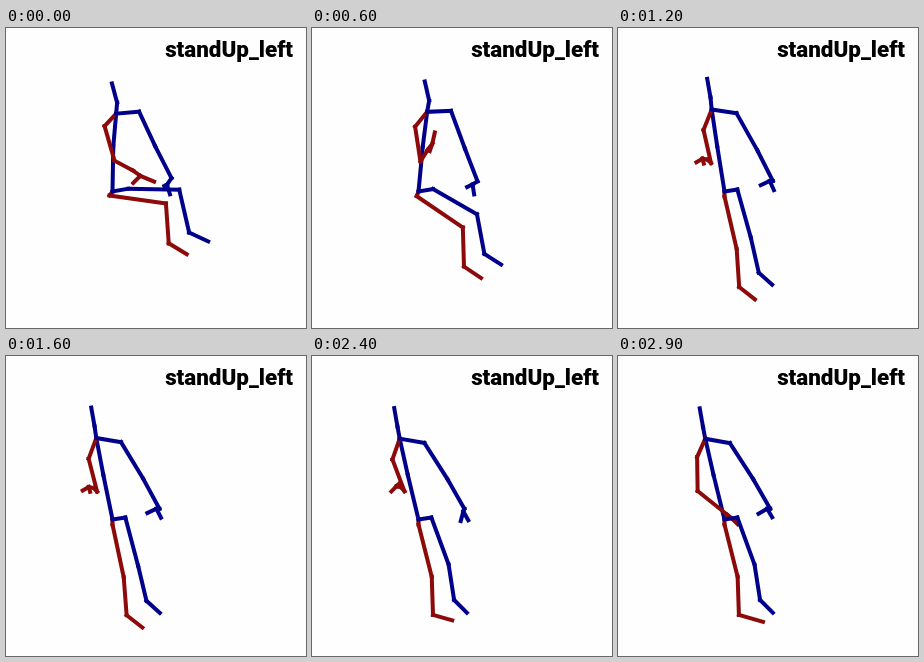
These frames come from a looping animation (300x300 px, 3000 ms). An HTML page with a canvas:

```html
<!DOCTYPE html>
<html>
<head>
<meta charset="utf-8">
<style>
  html, body { margin: 0; height: 100%; overflow: hidden; background: #fefefe; }
  canvas { display: block; }
</style>
</head>
<body>
<canvas id="stage" width="300" height="300"></canvas>
<script>
const ctx = document.getElementById('stage').getContext('2d');
const LOOP = 3000, STEP = 100;
const BLUE = '#00008b', RED = '#8c0a0a';
const PELVIS = [106, 163];

// A bone turns from its sitting to its standing angle (degrees, clockwise).
// len: sitting, standing and optional final length.
// lean, drift and reach: extra turn while leaning forward, settling and reaching.
const bone = (len, sit, stand, extra) =>
  ({ len, sit, stand, lean: 0, drift: 0, reach: 0, ...extra });

const trunk = [
  bone([45, 46], -89, -104, { lean: 12 }),
  bone([33, 37], -85, -103, { lean: 11 }),
  bone([11, 12], -85, -101, { lean: 13 }),
  bone([20, 19], -105, -100)
];
const blueLeg = [
  bone([16, 13], -10, -9),
  bone([51, 50], 1, 76, { lean: -4, drift: -6 }),
  bone([44, 36], 77, 76, { lean: 3, drift: 5 }),
  bone([21, 18], 25, 42, { drift: 3 })
];
const redLeg = [
  bone([5, 5], 127, 90),
  bone([57, 54], 8, 79, { lean: -5, drift: -3 }),
  bone([40, 38], 86, 85, { lean: 3, drift: 3 }),
  bone([21, 20, 25], 31, 38, { drift: -22 })
];
const blueArm = [
  bone([23, 25], -5, 10, { lean: -4 }),
  bone([38, 43], 65, 57, { lean: 9 }),
  bone([36, 34], 63, 60, { lean: 8 }),
  bone([8, 3], 124, 180, { drift: -70, reach: 70 })
];
const blueFingers = [
  bone([3, 10], 155, 155, { drift: -50, reach: 45 }),
  bone([10, 10], 73, 60, { lean: 15 })
];
const redArm = [
  bone([17, 22, 20], 133, 109, { lean: 7, reach: 5 }),
  bone([36, 34, 34], 74, 74, { lean: 8, drift: -5, reach: 20 }),
  bone([21, 5, 38], 28, -129, { lean: -20, reach: 168 }),
  bone([9, 5, 6], 36, -169, { reach: 208 })
];
const redFingers = [
  bone([15, 7, 8], 23, -210, { drift: -15, reach: -90 }),
  bone([10, 5, 7], 135, 75, { drift: -120, reach: -100 })
];

const mix = (a, b, k) => a + (b - a) * k;

function smooth(t, from, to) {
  const u = Math.min(1, Math.max(0, (t - from) / (to - from)));
  return u * u * (3 - 2 * u);
}

function phasesAt(t) {
  return {
    rise: smooth(t, 100, 1200),
    lean: t / 400 * Math.exp(1 - t / 400),
    drift: smooth(t, 1700, 2400),
    reach: smooth(t, 2400, 2900)
  };
}

// Joints of a chain of bones, beginning at the given joint.
function chain(start, bones, now) {
  const joints = [start];
  for (const b of bones) {
    const [short, long, final = long] = b.len;
    const length = mix(mix(short, long, now.rise), final, now.reach);
    const angle = (mix(b.sit, b.stand, now.rise) + b.lean * now.lean
      + b.drift * now.drift + b.reach * now.reach) * Math.PI / 180;
    const [x, y] = joints[joints.length - 1];
    joints.push([x + length * Math.cos(angle), y + length * Math.sin(angle)]);
  }
  return joints;
}

function drawChain(color, start, bones, now) {
  const joints = chain(start, bones, now);
  ctx.strokeStyle = color;
  for (let i = 1; i < joints.length; i++) {
    ctx.beginPath();
    ctx.moveTo(...joints[i - 1]);
    ctx.lineTo(...joints[i]);
    ctx.stroke();
  }
  return joints;
}

function drawArm(color, chest, arm, fingers, now) {
  const hand = drawChain(color, chest, arm, now).pop();
  for (const finger of fingers) drawChain(color, hand, [finger], now);
}

function draw(t) {
  ctx.setTransform(1, 0, 0, 1, 0, 0);
  ctx.fillStyle = '#fefefe';
  ctx.fillRect(0, 0, 300, 300);
  ctx.fillStyle = '#000';
  ctx.font = '900 22.4px Roboto, sans-serif';
  ctx.textAlign = 'right';
  ctx.fillText('standUp_left', 287, 28.5);

  ctx.translate(0.5, 0.5);
  ctx.lineWidth = 4;
  ctx.lineCap = 'square';
  const now = phasesAt(t);
  const chest = drawChain(BLUE, PELVIS, trunk, now)[2];
  drawArm(RED, chest, redArm, redFingers, now);
  drawArm(BLUE, chest, blueArm, blueFingers, now);
  drawChain(RED, PELVIS, redLeg, now);
  drawChain(BLUE, PELVIS, blueLeg, now);
}

const start = performance.now();
function tick() {
  const t = (performance.now() - start) % LOOP;
  draw(Math.floor(t / STEP) * STEP);
  requestAnimationFrame(tick);
}
tick();
</script>
</body>
</html>
```
